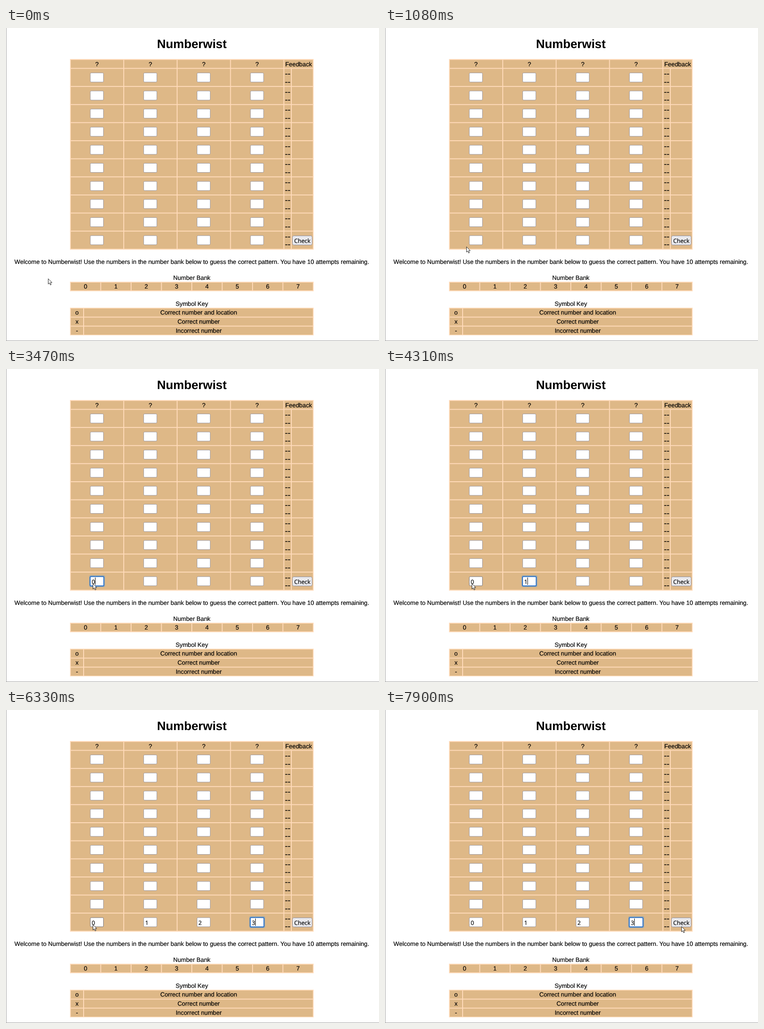
Recreate the animation shown at these times as an HTML page. Size 817 by 686 pixels, loop 8 s.

```html
<!DOCTYPE html>
<html lang="en">
<head>
<meta charset="utf-8">
<title>Numberwist</title>
<style>
  html, body { margin: 0; width: 100%; height: 100%; overflow: hidden; background: #fff; }
  svg { display: block; width: 817px; height: 686px; }
  text {
    font: 13.333px "Liberation Sans", Arial, sans-serif; text-anchor: middle;
    text-rendering: geometricPrecision; stroke: #000; stroke-width: .2px;
  }
  .title { font-size: 26.667px; font-weight: bold; stroke: none; }
  .peg { font-size: 17.8px; }
  .ui { font: 12.7px "Open Sans", "Noto Sans", sans-serif; }
  .digit { text-anchor: start; }
  .field { fill: #fff; stroke: #8f8f9d; stroke-width: .9; }
</style>
</head>
<body>
<svg id="stage" viewBox="0 0 817 686"></svg>
<script>
const NS = 'http://www.w3.org/2000/svg';
const stage = document.getElementById('stage');
const LOOP = 8000;
const CENTER = 407;
const COL = 116.9;
const ROW = 39.63;

function add(tag, attrs, content) {
  const el = document.createElementNS(NS, tag);
  for (const key in attrs) el.setAttribute(key, attrs[key]);
  if (content !== undefined) el.textContent = content;
  return stage.appendChild(el);
}
const box = (x, y, right, bottom, fill) =>
  add('rect', { x, y, width: right - x, height: bottom - y, fill });
const board = (y, bottom) => box(140.2, y, 673.8, bottom, '#ffdab9');
const cell = (x, y, right, bottom) => box(x, y, right, bottom, '#deb887');
const label = (x, y, content, cls = '') => add('text', { x, y, class: cls }, content);
const show = (el, on) => el.setAttribute('visibility', on ? 'visible' : 'hidden');

// Page edge and heading
box(0, 0, 1, 686, '#a0a0a0');
box(0, 685, 817, 686, '#a0a0a0');
label(CENTER, 44, 'Numberwist', 'title');

// Guess board
board(68, 485.8);
const fields = [];
const rowTop = i => 87.5 + ROW * i;
for (let c = 0; c < 4; c++) {
  const x = 142 + COL * c;
  cell(x, 70, x + COL - 2, rowTop(0));
  label(199.3 + COL * c, 83.8, '?');
}
cell(609.6, 70, 672, rowTop(0));
label(641, 83.8, 'Feedback');
for (let r = 0; r < 10; r++) {
  const top = rowTop(r) + 2, bottom = rowTop(r + 1);
  for (let c = 0; c < 4; c++) {
    const x = 142 + COL * c;
    cell(x, top, x + COL - 2, bottom);
    fields.push(add('rect', {
      x: x + 42.7, y: top + 8.9, width: 28.8, height: 20, rx: 2, class: 'field'
    }));
  }
  cell(609.6, top, 624, bottom);
  cell(626, top, 672, bottom);
  label(617, 106 + ROW * r, '--', 'peg');
  label(617, 123.6 + ROW * r, '--', 'peg');
}
add('rect', {
  x: 627.5, y: 455.5, width: 43, height: 20, rx: 3, fill: '#e9e9ed', stroke: '#8f8f9d'
});
label(649, 470.7, 'Check', 'ui');

label(CENTER, 517, 'Welcome to Numberwist! Use the numbers in the number bank below to guess ' +
  'the correct pattern. You have 10 attempts remaining.');

// Number bank
label(CENTER, 552, 'Number Bank');
board(556, 577);
for (let n = 0; n < 8; n++) {
  const left = 142 + 66.5 * n;
  cell(left, 558, left + 64.5, 575);
  label(left + 32.2, 571, n);
}

// Symbol key
label(CENTER, 609, 'Symbol Key');
board(613, 673.5);
[['o', 'Correct number and location'], ['x', 'Correct number'], ['-', 'Incorrect number']]
  .forEach(([mark, meaning], i) => {
    const y = 614.8 + 19.8 * i;
    cell(142, y, 169, y + 17.8);
    cell(171, y, 672, y + 17.8);
    label(155.5, y + 13.2, mark);
    label(422, y + 13.2, meaning);
  });

// Moving parts
const halo = add('rect', { x: 182, y: 452, width: 35, height: 26, rx: 4, fill: '#0a84ff' });
const ring = add('rect', {
  x: 184.4, y: 455, width: 29.8, height: 20.4, rx: 2,
  fill: '#fff', stroke: '#0f62c9', 'stroke-width': 1.6
});
const digits = [0, 1, 2, 3].map(n => label(187.8 + COL * n, 470.5, n, 'ui digit'));
const caret = box(188, 457, 189, 473, '#000');
const arrow = add('path', {
  d: 'M.5 .6V12.2L3.2 9.7L5 14.2L7 13.4L5.2 9H8.9Z',
  fill: '#fff', stroke: '#111', 'stroke-width': .9, 'stroke-linejoin': 'round'
});

// Each entry: time, x, y of the pointer tip
const pointer = [
  [0, 92, 549], [500, 94, 547], [600, 101, 542], [700, 115, 530], [800, 133, 515],
  [900, 151, 500], [1000, 167, 487], [1080, 178, 479], [1170, 186, 473], [1230, 190, 470],
  [7190, 204, 471], [7270, 268, 473], [7350, 364, 476], [7430, 453, 479], [7510, 526, 482],
  [7590, 581, 485], [7660, 615, 484], [7740, 636, 480], [7820, 646, 476], [7900, 649, 474]
];
const focusAt = [1310, 3870, 4640, 5380];
const typeAt = [3470, 4310, 4950, 6330];
const fade = [[1310, .12], [1390, .22], [1470, .3]];

const current = (steps, t) => steps.findLast(step => step[0] <= t);

function draw(t) {
  const [, x, y] = current(pointer, t);
  arrow.setAttribute('transform', `translate(${x} ${y})`);

  const hovered = t >= 1230 && t < 7190;
  fields[36].style.stroke = hovered ? '#676774' : '';

  digits.forEach((el, i) => show(el, t >= typeAt[i]));
  const focus = focusAt.findLastIndex(at => t >= at);
  [halo, ring, caret].forEach(el => show(el, focus >= 0));
  if (focus < 0) return;
  const dx = COL * focus;
  halo.setAttribute('transform', `translate(${dx})`);
  halo.setAttribute('opacity', current(fade, t)[1]);
  ring.setAttribute('transform', `translate(${dx})`);
  caret.setAttribute('transform', `translate(${Math.round(dx) + (t >= typeAt[focus] ? 7 : 0)})`);
}

const start = performance.now();
function tick() {
  draw((performance.now() - start) % LOOP);
  requestAnimationFrame(tick);
}
tick();
</script>
</body>
</html>
```
